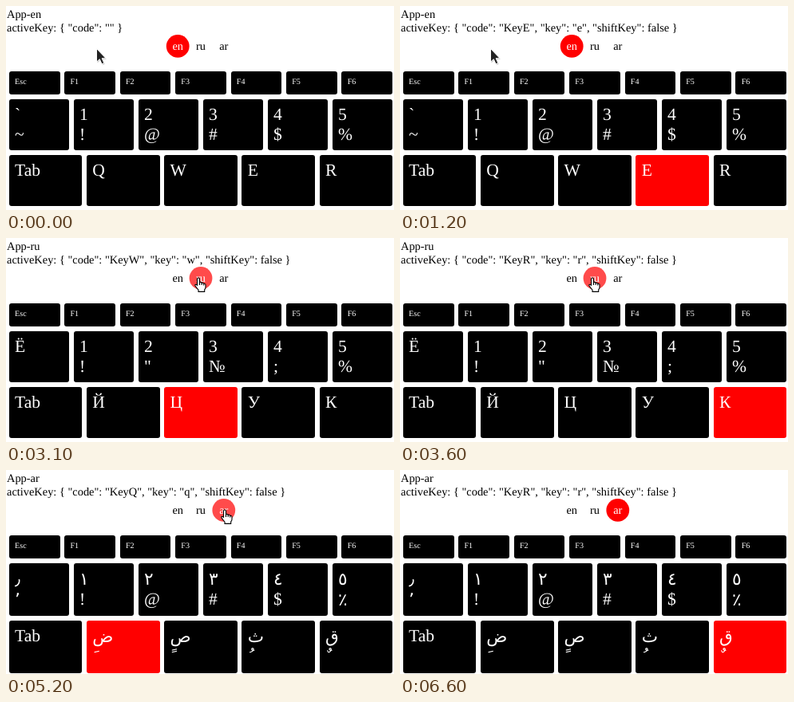
An HTML page for the animation above (6900 ms loop, 486 by 256 pixels).

```html
<!DOCTYPE html>
<html lang="en">
<head>
<meta charset="utf-8">
<title>On-screen keyboard</title>
<style>
  html, body { margin: 0; width: 100%; height: 100%; overflow: hidden; background: #fff; }
  svg { display: block; width: 486px; height: 256px; }
  text {
    font: 14.4px "Liberation Serif", "DejaVu Sans", serif;
    text-rendering: geometricPrecision;
    white-space: pre;
  }
  .key text { fill: #fff; font-size: 21.6px; }
  .key.small text { font-size: 10.08px; }
  .key.on rect { fill: #f00; }
  .lang circle { fill: none; }
  .lang.on circle { fill: #f00; }
  .lang.on text { fill: #fff; }
  .lang.hover { opacity: .7; }
</style>
</head>
<body>
<svg id="stage" viewBox="0 0 486 256">
  <text id="title" x="1" y="15"></text>
  <text id="status" x="1" y="31.5"></text>
  <g id="langs"></g>
  <g id="keys"></g>
  <g id="arrow">
    <path d="M1 1.5V18L4.7 14.6L7.4 20.6L10.3 19.4L7.6 13.6H12.4Z" fill="#000" opacity=".2"/>
    <path d="M0 0V16.6L3.8 13.2L6.5 19.2L9.3 18L6.7 12.2H11.6Z" fill="#222" stroke="#fff" stroke-linejoin="round"/>
  </g>
  <g id="hand" stroke="#000" stroke-width="1.1" stroke-linejoin="round">
    <path fill="#fff" d="M-1 9.5V1.5Q-1 0 .5 0T2 1.5V6.2Q2.2 5.3 3.4 5.4Q4.6 5.5 4.7 6.6Q5.1 6 6 6.2Q7.1 6.4 7.2 7.4Q9.5 7 9.5 9V12Q9.5 13.8 8.2 14.8V17.4H.5V15.2Q-1.8 12.8 -3.6 9.8Q-4 8.4 -2.7 8.2Q-1.9 8.2 -1 9.5Z"/>
    <path fill="none" d="M2 6V9M4.7 6.6V9M7.2 7.4V9.4"/>
  </g>
</svg>
<script>
const LOOP = 6900;
const SVG = "http://www.w3.org/2000/svg";
const $ = id => document.getElementById(id);

const langs = ["en", "ru", "ar"];
const functionKeys = ["Esc", "F1", "F2", "F3", "F4", "F5", "F6"];
// Each key is [plain, shifted].
const layouts = {
  en: [
    [["`", "~"], ["1", "!"], ["2", "@"], ["3", "#"], ["4", "$"], ["5", "%"]],
    [["Tab"], ["Q"], ["W"], ["E"], ["R"]]
  ],
  ru: [
    [["Ё"], ["1", "!"], ["2", "\""], ["3", "№"], ["4", ";"], ["5", "%"]],
    [["Tab"], ["Й"], ["Ц"], ["У"], ["К"]]
  ],
  ar: [
    [["\u066B", "\u066C"], ["\u0661", "!"], ["\u0662", "@"], ["\u0663", "#"], ["\u0664", "$"], ["\u0665", "\u066A"]],
    [["Tab"], ["\u0636", "\u064E"], ["\u0635", "\u064B"], ["\u062B", "\u064F"], ["\u0642", "\u064C"]]
  ]
};

// [time, value] tables
const presses = [
  [0, ""], [400, "Q"], [700, "W"], [1200, "E"], [1300, "R"],
  [2800, "Q"], [3100, "W"], [3300, "E"], [3600, "R"],
  [5200, "Q"], [5400, "W"], [5600, "E"], [5800, "R"]
];
const clicks = [[0, "en"], [2300, "ru"], [4400, "ar"]];
const pointer = [
  [0, [113.5, 53.5]], [1400, [136, 60]], [1500, [171, 65]],
  [1700, [190, 63]], [1800, [212, 58]], [1900, [232, 53]], [2000, [240.5, 50]],
  [3900, [251, 52.5]], [4000, [264.5, 52]], [4200, [273.5, 50]],
  [6100, [238, 35]], [6200, [180, 22]], [6300, [124, 12]], [6400, [92, 8]],
  [6600, null]
];

const at = (table, t) => table.filter(step => step[0] <= t).pop()[1];

function add(parent, name, attrs, text) {
  const el = document.createElementNS(SVG, name);
  for (const k in attrs) el.setAttribute(k, attrs[k]);
  if (text) el.textContent = text;
  parent.append(el);
  return el;
}

const langX = i => 215.2 + 28.8 * i;
const langEls = langs.map((name, i) => {
  const g = add($("langs"), "g", { class: "lang" });
  add(g, "circle", { cx: langX(i), cy: 50.4, r: 14.4 });
  add(g, "text", { x: langX(i), y: 55, "text-anchor": "middle" }, name);
  return g;
});

function addKey(parent, i, count, top, height, lines, base) {
  const left = 3.88 + i * 486 / count;
  const x = Math.round(left);
  const right = Math.round(left + 486 / count - 5.76);
  const g = add(parent, "g", { class: "key" });
  add(g, "rect", { x, y: top, width: right - x, height, rx: 3 });
  let y = top + base;
  lines.forEach((line, n) => {
    if (n) y += 25;
    if (/[\u0600-\u06FF]/.test(line)) y += 1;
    add(g, "text", { x: left + 7.2, y }, line);
  });
  return g;
}

functionKeys.forEach((label, i) =>
  addKey($("keys"), i, functionKeys.length, 82, 29, [label], 16).classList.add("small"));

const boards = {};
for (const name of langs) {
  const height = name === "ar" ? 66 : 64;
  const group = add($("keys"), "g", {});
  const letters = {};
  layouts[name].forEach((row, r) => row.forEach((lines, i) => {
    const key = addKey(group, i, row.length, 117 + r * (height + 6), height, lines, 26);
    if (r) letters[" QWER"[i]] = key;
  }));
  boards[name] = { group, letters };
}

function statusText(key) {
  if (!key) return 'activeKey: { "code": "" }';
  return `activeKey: { "code": "Key${key}", "key": "${key.toLowerCase()}", "shiftKey": false }`;
}

function show(el, visible) {
  el.style.display = visible ? "" : "none";
}

function render(t) {
  const key = at(presses, t);
  const lang = at(clicks, t);
  const pos = at(pointer, t);

  $("title").textContent = "App-" + lang;
  $("status").textContent = statusText(key);

  let over = false;
  langEls.forEach((el, i) => {
    const hover = !!pos && Math.hypot(pos[0] - langX(i), pos[1] - 50.4) < 14.4;
    over = over || hover;
    el.classList.toggle("on", langs[i] === lang);
    el.classList.toggle("hover", hover);
  });

  for (const name of langs) {
    const { group, letters } = boards[name];
    show(group, name === lang);
    for (const k in letters) letters[k].classList.toggle("on", k === key);
  }

  show($("arrow"), pos && !over);
  show($("hand"), pos && over);
  if (pos) $(over ? "hand" : "arrow").setAttribute("transform", `translate(${pos})`);
}

const start = performance.now();
function tick() {
  render((performance.now() - start) % LOOP);
  requestAnimationFrame(tick);
}
tick();
</script>
</body>
</html>
```
